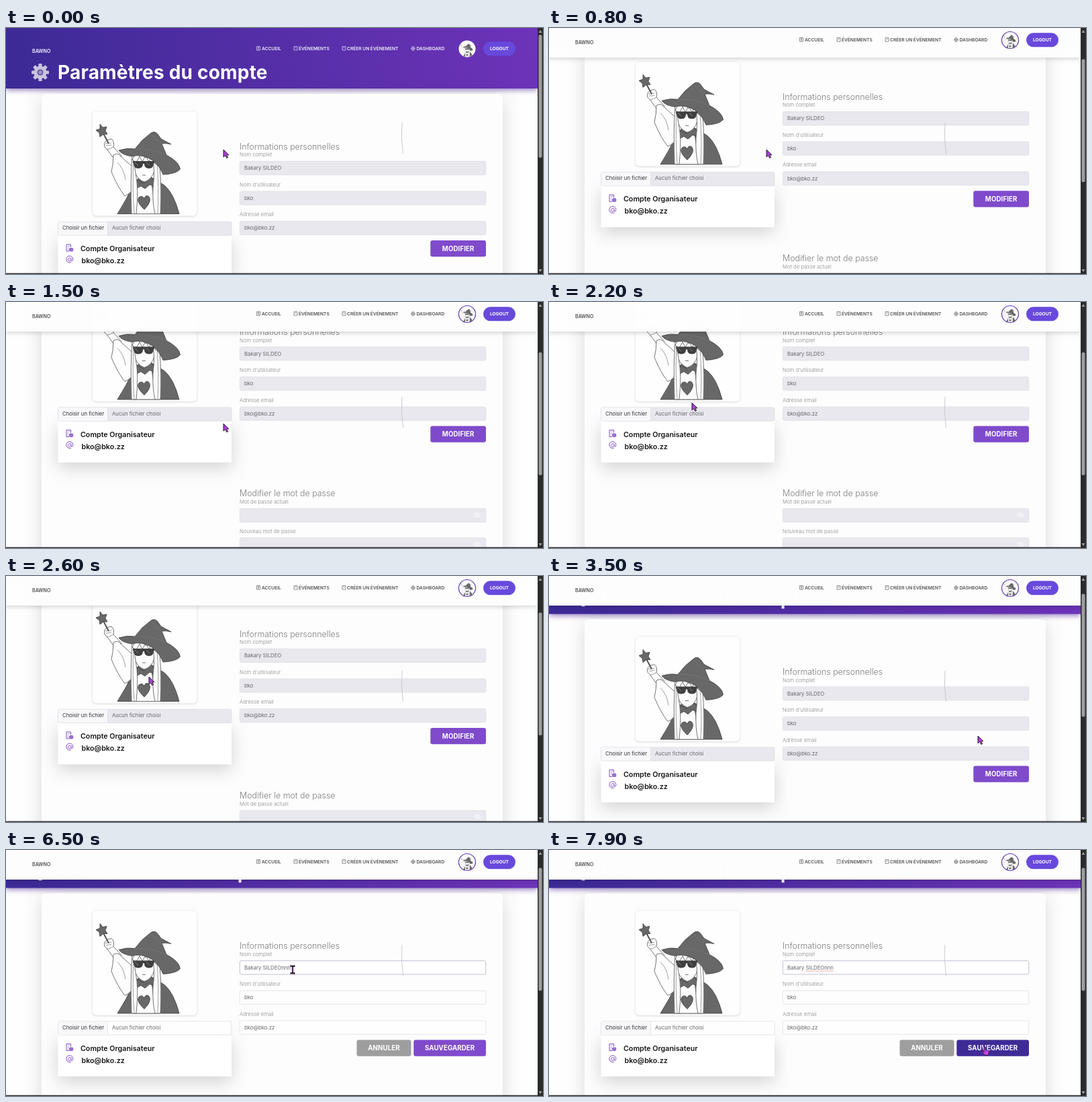
An HTML page that plays this animation: 800 px wide and 366 px high, repeating every 8000 ms.

```html
<!DOCTYPE html>
<html lang="fr">
<head>
<meta charset="utf-8">
<title>Paramètres du compte</title>
<style>
  html, body { margin: 0; width: 100%; height: 100%; overflow: hidden; background: #fefefe; }
  #stage { display: block; width: 800px; height: 366px; font-family: Inter, sans-serif; }
  .title { font: 700 28px Inter, sans-serif; fill: #fff; letter-spacing: .2px; }
  .head { font-size: 12.4px; font-weight: 300; fill: #7c7c7c; }
  .label { font-size: 7.75px; font-weight: 300; fill: #8a8a8a; }
  .value { font-size: 7.75px; fill: #66666c; }
  .info { font-size: 10.7px; font-weight: 600; fill: #161616; }
  .btn { font-size: 9.7px; font-weight: 700; fill: #fff; text-anchor: middle; letter-spacing: .1px; }
  .nav { font-size: 6.65px; font-weight: 600; }
  .logo { font-size: 7.1px; font-weight: 600; }
  .box { fill: #e8e8ee; stroke: #dcdce3; stroke-width: .7; }
  .edit .box { fill: #fefefe; }
  .edit .focus { stroke: #c4c1d2; stroke-width: 1; }
  .edit #modify, #editing { display: none; }
  .edit #editing { display: inline; }
  .soft { filter: drop-shadow(0 8px 13px rgba(0, 0, 0, .17)); }
  .card { filter: drop-shadow(0 6px 14px rgba(0, 0, 0, .15)); }
  .band { filter: drop-shadow(0 2px 4px rgba(75, 40, 150, .65)); }
  .bar { filter: drop-shadow(0 2px 3px rgba(0, 0, 0, .17)); }
  .photo { filter: drop-shadow(0 1px 1px rgba(0, 0, 0, .12)); }
  .icon { fill: none; stroke: #7f4bcb; stroke-width: 1; }
  .ink { fill: #686868; stroke: #474747; stroke-width: .9; stroke-linejoin: round; }
  .pale { fill: #fdfdfd; stroke: #666; stroke-width: .9; stroke-linejoin: round; }
  .hair { fill: none; stroke: #777; stroke-width: .7; }
</style>
</head>
<body>
<svg id="stage" viewBox="0 0 800 366">
  <defs>
    <linearGradient id="violet" gradientUnits="userSpaceOnUse" x1="0" y1="90" x2="780" y2="-20">
      <stop offset="0" stop-color="#3c2a95"/><stop offset="1" stop-color="#6d33b9"/>
    </linearGradient>
    <linearGradient id="pink" x2="1" y2="1">
      <stop offset="0" stop-color="#8e35d4"/><stop offset="1" stop-color="#d84be6"/>
    </linearGradient>
    <clipPath id="round"><circle cx="687" cy="31" r="12"/></clipPath>
    <symbol id="witch" viewBox="128 123 156 156">
      <path class="ink" d="M190 232Q180 255 166 276.500H258Q250 246 236 234L218 223H198Z"/>
      <path class="pale" d="M147 177Q145 171 150 167L157 165Q162 169 160 177L172 190L164 199L151 181Z"/>
      <path class="pale" d="M160 189Q167 185 171 191L190 208L192 236Q186 246 177 250Q166 236 157 214Q160 202 160 189Z"/>
      <path class="hair" d="M150 181Q155 180 160 177M148 172l9-1M149 175l8-1M166 200Q176 210 178 226"/>
      <path class="pale" d="M195 234L217 231L223 276.500H189Z"/>
      <path class="ink" d="M196 226L205 231L216 221L226 237L214 233L207 239L201 235L192 240Z"/>
      <path class="pale" d="M190 190Q187 222 206 229Q223 224 223 195Z"/>
      <path class="pale" d="M188 188Q185 225 187 276.500H194Q198 240 193 215Q190 203 194 192ZM219 195Q222 215 219 238Q218 260 222 276.500H230Q232 240 229 206Z"/>
      <path class="hair" d="M190 196Q188 240 191 276M225 200Q228 240 226 276"/>
      <path class="pale" d="M188 196Q193 184 206 184Q222 188 229 206L222 202L217 192L213 199L208 190L203 199L199 191L194 200Z"/>
      <path class="ink" d="M168 182Q180 178 192 180L203 167L215 157Q221 152 226 158L231 165L246 173Q238 171 232 172L239 189Q258 199 259.500 210Q254 217 234 218Q226 198 209 192Q196 188 188 191Q173 189 168 182Z"/>
      <path class="hair" d="M192 180Q218 179 239 189M216 158Q221 166 232 172"/>
      <path d="M189 198h32v3h-1q0 8-7 8t-7-7h-2q0 7-7 7t-7-8h-1z" fill="#3f3f3f"/>
      <path d="M192 200l5 5M209 200l5 5" stroke="#888"/>
      <path d="M203 219h5" stroke="#666" stroke-width=".9"/>
      <path class="ink" d="M206 270Q193 258 198 252Q203 248 206 254Q208 247 213 251Q218 258 206 270Z"/>
      <path d="M145 157L153 172" stroke="#555" stroke-width="2"/>
      <path class="ink" d="M140 143l4 5 6-1-2 6 3 5-6 0-5 4-1-6-5-4 6-2z"/>
    </symbol>
  </defs>

  <rect width="800" height="366" fill="#fefefe"/>
  <g id="page"></g>
  <g id="navbar"></g>

  <path d="M590 141Q588 163 591.5 187" fill="none" stroke="#c6c6ca" stroke-width=".9"/>
  <rect x="792" width="8" height="366" fill="#2b2b2b"/>
  <path d="M793.5 7l2.5-4 2.5 4zM793.5 359l2.5 4 2.5-4z" fill="#a0a0a0"/>
  <rect id="thumb" x="793.5" y="10" width="5" height="183" rx="2.5" fill="#9d9d9d"/>
  <rect y="364.7" width="800" height="1.3" fill="#2b2b2b"/>

  <g id="cursor" stroke-linejoin="round">
    <path id="arrow" d="M0 0V11L2.7 8.6L4.7 12.6L6.6 11.6L4.7 7.8H8Z" fill="url(#pink)" stroke="#25202b" stroke-width="1"/>
    <g id="beam" fill="none">
      <path d="M-3.5-5.5Q0-5.5 0-4Q0-5.5 3.5-5.5M0-4V4M-3.5 5.5Q0 5.5 0 4Q0 5.5 3.5 5.5" stroke="#29222f" stroke-width="2.4"/>
      <path d="M0-4V4" stroke="#a440d5" stroke-width=".9"/>
    </g>
    <path id="hand" d="M-1 0Q0-1.3 1 0V4L6 5.4Q7 6 6.5 8L5 12H0L-4 7.5Q-4 5.6-1 7.4Z" fill="url(#pink)" stroke="#2b2033" stroke-width=".8"/>
  </g>
</svg>

<script>
const LOOP = 8000, STEP = 100;
const EDIT_AT = 4300, FOCUS_AT = 5300, SPELL_AT = 6700;
const KEYS_AT = [5800, 6000, 6200];
const NAME = "Bakary SILDEO", USER = "bko", MAIL = "bko@bko.zz";
const BRAND = "BAWNO";

// [time, value...]
const SCROLL = [[300, 0], [1100, 118], [1200, 119.5], [1400, 131.5], [2300, 131.5], [2600, 90], [3000, 33.5]];
const POINTER = [[1500, 324, 181], [2000, 213, 150], [2800, 213, 150], [3300, 639, 238], [3600, 639, 238],
  [4000, 672, 293], [4500, 672, 293], [5100, 427, 178], [6800, 427, 178], [7300, 649, 293]];
const NAV = [[300, 0], [600, 1]];

const $ = id => document.getElementById(id);
const text = (cls, x, y, s, extra = "") => `<text class="${cls}" x="${x}" y="${y}" ${extra}>${s}</text>`;
const rect = (x, y, w, h, extra = "") => `<rect x="${x}" y="${y}" width="${w}" height="${h}" ${extra}/>`;

function field(y, label, value, id = "") {
  return text("label", 348, y - 7, label) +
    rect(348.3, y + .3, 366.5, 20.2, `rx="2" class="box" ${id && `id="${id}Box"`}`) +
    text("value", 355, y + 13.1, value, id && `id="${id}"`);
}
function button(x, w, label, fill, id) {
  return rect(x, 316, w, 24.3, `rx="3" fill="${fill}" id="${id}"`) + text("btn", x + w / 2, 331.7, label);
}
function eye(y) {
  return `<g fill="none" stroke="#fafafd" stroke-width="1"><path d="M697 ${y}q5-6 10.5 0q-5 6-10.5 0z"/>
    <circle cx="702.3" cy="${y}" r="1.7"/><path d="M697.5 ${y - 4.5}l10 9"/></g>`;
}
function gear() {
  const teeth = Array.from({ length: 8 }, (_, i) =>
    rect(-2.6, -13, 5.2, 7, `rx="1" transform="rotate(${i * 45})"`)).join("");
  return `<g transform="translate(51 66)" fill="#cbc4df">${teeth}<circle r="9.5"/>
    <circle r="4.6" fill="#6d58a7"/><circle r="2.5" fill="#a79bc9"/></g>`;
}

$("page").innerHTML =
  rect(0, -20, 792, 110, 'fill="url(#violet)" class="band"') + gear() +
  text("title", 77, 76, "Paramètres du compte") +
  rect(53, 98, 687, 590, 'rx="6" fill="#fdfdfd" class="card"') +
  rect(128.5, 123.5, 156, 156, 'rx="6" fill="#fefefe" stroke="#ececef" stroke-width=".6" class="photo"') +
  '<use href="#witch" x="128" y="123" width="156" height="156"/>' +
  rect(77.5, 309, 258.5, 61.2, 'fill="#fff" class="soft"') +
  rect(77.5, 288.3, 258.5, 20.2, 'rx="2" class="box"') +
  rect(78, 288.7, 73.5, 19.5, 'fill="#f8f8fb"') +
  '<path d="M151.5 288.5V308.5" stroke="#dcdce3" stroke-width=".7"/>' +
  text("value", 84, 300.2, "Choisir un fichier", 'style="fill:#333"') +
  text("value", 158, 300.2, "Aucun fichier choisi") +
  '<path class="icon" d="M90 332V322h6.5v4M90 332h4M92 324.5h1M94 324.5h1M92 327h1M92 329.5h1"/>' +
  '<rect x="94.5" y="327.5" width="5.2" height="4.5" rx="1" fill="#9a73d6" stroke="#7f4bcb" stroke-width=".8"/>' +
  '<path class="icon" d="M97 345a2.3 2.3 0 1 1-.5-2M97 342v3q.3 2 1.800 1.5q1.3-1 .9-3.5a5 5 0 1 0-2.5 5.5"/>' +
  text("info", 111, 332, "Compte Organisateur") + text("info", 112.5, 350, MAIL) +
  text("head", 348, 180.5, "Informations personnelles") +
  field(198, "Nom complet", NAME, "name") +
  field(242.6, "Nom d'utilisateur", USER) +
  field(287.2, "Adresse email", MAIL) +
  '<path id="spell" fill="none" stroke="#d65a4a" stroke-width=".9" stroke-dasharray="1 1"/>' +
  `<g id="modify">${button(632.3, 82.7, "MODIFIER", "#7f4bcb", "modifyBtn")}</g>` +
  `<g id="editing">${button(522.5, 81, "ANNULER", "#9e9e9e", "cancelBtn")}${button(607.3, 107.7, "SAUVEGARDER", "#7f4bcb", "saveBtn")}</g>` +
  text("head", 348, 420.5, "Modifier le mot de passe") +
  field(438.5, "Mot de passe actuel", "") + eye(448.2) +
  field(482, "Nouveau mot de passe", "") + eye(492);

const LINKS = [[373, 381, "ACCUEIL"], [428.5, 436, "ÉVÉNEMENTS"], [500.5, 508, "CRÉER UN ÉVÉNEMENT"], [603.5, 611.5, "DASHBOARD"]];
const glyph = (x, i) => i === 3
  ? `<circle cx="${x + 3}" cy="30.5" r="2.7"/><path d="M${x} 30.5h6M${x + 3} 27.5v6"/>`
  : `<path d="M${x + .5} 27.5h5v5.5h-5zM${x + 2} 29.5h2${i ? "" : `M${x + 3} 27.5v5.5`}"/>`;

$("navbar").innerHTML =
  rect(0, -20, 792, 64, 'id="navBg" class="bar" fill="#fefefe"') +
  '<g id="navItems"><g id="navInk">' + text("logo", 39, 37.4, BRAND) +
  LINKS.map(([gx, x, s], i) =>
    `<g class="glyph" fill="none" stroke-width=".65">${glyph(gx, i)}</g>` + text("nav", x, 33.3, s)).join("") + "</g>" +
  '<circle id="ring" cx="687" cy="31" r="12.5" fill="#fefefe" stroke="#5c39b4" stroke-width="1.2"/>' +
  '<g clip-path="url(#round)"><use href="#witch" x="674.5" y="18.5" width="25" height="25"/></g>' +
  rect(711, 20.3, 48, 21, 'rx="10.5" fill="#6849dc"') +
  text("nav", 735, 33.3, "LOGOUT", 'fill="#fff" text-anchor="middle" style="font-weight:700"') + "</g>";

function at(keys, t, ease = p => p) {
  const i = keys.findIndex(k => k[0] > t);
  if (i === 0) return keys[0].slice(1);
  if (i < 0) return keys[keys.length - 1].slice(1);
  const [a, b] = [keys[i - 1], keys[i]];
  const p = ease((t - a[0]) / (b[0] - a[0]));
  return a.slice(1).map((v, j) => v + (b[j + 1] - v) * p);
}
const smooth = p => p * p * (3 - 2 * p);
const show = (id, on) => $(id).setAttribute("visibility", on ? "visible" : "hidden");

function draw(t) {
  const [scroll] = at(SCROLL, t), [x, y] = at(POINTER, t, smooth), [nav] = at(NAV, t);
  const edit = t >= EDIT_AT, docY = y + scroll;

  $("page").setAttribute("transform", `translate(0 ${-scroll})`);
  $("thumb").setAttribute("y", 10 + scroll * .493);
  $("page").classList.toggle("edit", edit);
  $("nameBox").classList.toggle("focus", t >= FOCUS_AT);

  $("navItems").setAttribute("transform", `translate(0 ${-13 * nav})`);
  $("navBg").setAttribute("opacity", .995 * nav);
  $("ring").setAttribute("stroke-opacity", nav);
  const mix = (from, to) => Math.round(from + (to - from) * nav);
  const ink = `rgb(${mix(245, 82)},${mix(242, 82)},${mix(252, 86)})`;
  $("navInk").setAttribute("fill", ink);
  document.querySelectorAll(".glyph").forEach(g => g.setAttribute("stroke", ink));

  const name = $("name"), typed = KEYS_AT.filter(k => t >= k).length;
  name.textContent = NAME + "n".repeat(typed);
  show("spell", t >= SPELL_AT);
  if (t >= SPELL_AT) {
    const from = name.getStartPositionOfChar(NAME.indexOf(" ") + 1).x;
    const to = name.getEndPositionOfChar(name.textContent.length - 1).x;
    $("spell").setAttribute("d", `M${from} 213.6H${to}`);
  }

  const onRow = docY > 316 && docY < 340.5 && x < 715;
  const onMain = onRow && x > (edit ? 607 : 632);
  const onCancel = onRow && edit && x > 522 && x < 603.5;
  const onField = edit && x > 348 && x < 715 && [198, 242.6, 287.2].some(f => docY > f && docY < f + 20.5);
  for (const id of ["modifyBtn", "saveBtn"]) $(id).setAttribute("fill", onMain ? "#3f2b96" : "#7f4bcb");

  $("cursor").setAttribute("transform", `translate(${x} ${y})`);
  show("hand", onMain || onCancel);
  show("beam", onField);
  show("arrow", !onMain && !onCancel && !onField);
}

const start = performance.now();
function tick() {
  const t = (performance.now() - start) % LOOP;
  draw(Math.floor(t / STEP) * STEP);
  requestAnimationFrame(tick);
}
tick();
</script>
</body>
</html>
```
